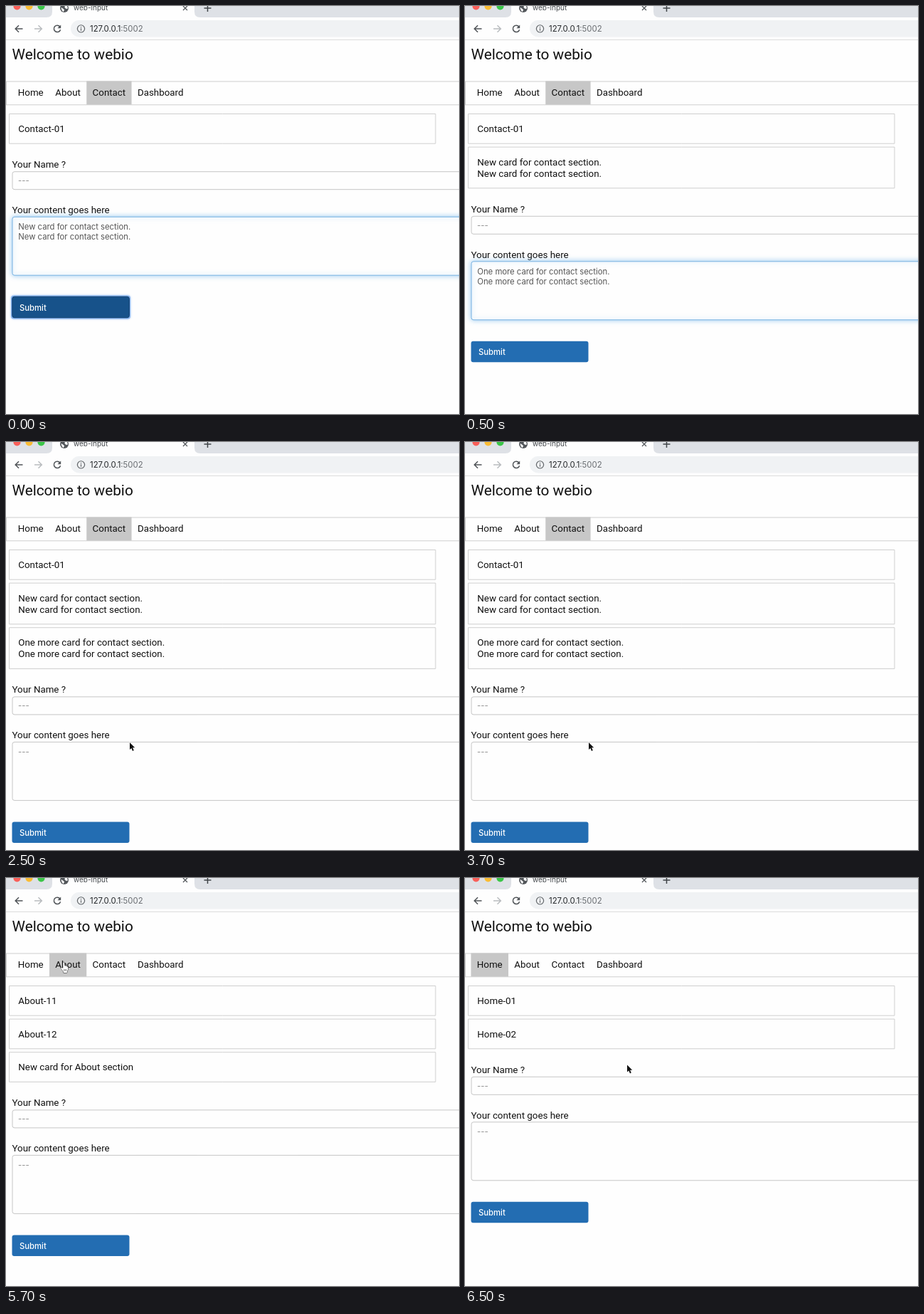
Recreate the animation shown at these times as an HTML page with a canvas. Size 637x573 px, loop 8000 ms.

```html
<!DOCTYPE html>
<html lang="en">
<head>
<meta charset="utf-8">
<title>web-input</title>
<style>
  html, body { margin: 0; width: 100%; height: 100%; overflow: hidden; background: #fefefe; }
  canvas { display: block; width: 637px; height: 573px; }
</style>
</head>
<body>
<canvas id="stage" width="637" height="573"></canvas>
<script>
const ctx = document.getElementById('stage').getContext('2d');
const W = 637, H = 573, LOOP = 8000;
const PAGE = '#fefefe', LINE = '#cfcfcf', INK = '#111';
const BODY = '13.35px Roboto, sans-serif';
const FIELD = '11.3px Inter, sans-serif';

const twice = s => [s, s];
const newCard = twice('New card for contact section.');
const moreCard = twice('One more card for contact section.');

const scenes = [
  { until: 500, tab: 'Contact', cards: [['Contact-01']], draft: newCard, pressed: true },
  { until: 2500, tab: 'Contact', cards: [['Contact-01'], newCard], draft: moreCard },
  { until: 4500, tab: 'Contact', cards: [['Contact-01'], newCard, moreCard], arrow: [174, 422] },
  { until: 6500, tab: 'About', cards: [['About-11'], ['About-12'], ['New card for About section']], hand: [77, 118] },
  { until: LOOP, tab: 'Home', cards: [['Home-01'], ['Home-02']], arrow: [228, 262.5] }
];

function text(str, x, y, font, color = INK) {
  ctx.font = font;
  ctx.fillStyle = color;
  ctx.fillText(str, x, y);
}

function rect(x, y, w, h, color) {
  ctx.fillStyle = color;
  ctx.fillRect(x, y, w, h);
}

function rounded(x, y, w, h, r, fill, stroke, width = 1) {
  ctx.beginPath();
  ctx.roundRect(x, y, w, h, r);
  if (fill) { ctx.fillStyle = fill; ctx.fill(); }
  if (stroke) { ctx.strokeStyle = stroke; ctx.lineWidth = width; ctx.stroke(); }
}

function disc(x, y, r, color) {
  ctx.beginPath();
  ctx.arc(x, y, r, 0, Math.PI * 2);
  ctx.fillStyle = color;
  ctx.fill();
}

function line(d, color, width = 1.4) {
  ctx.strokeStyle = color;
  ctx.lineWidth = width;
  ctx.stroke(new Path2D(d));
}

function glow(color, blur, draw) {
  ctx.save();
  ctx.shadowColor = color;
  ctx.shadowBlur = blur;
  draw();
  ctx.restore();
}

function browser() {
  rect(0, 0, W, 16, '#dee1e6');
  ctx.fillStyle = PAGE;
  ctx.fill(new Path2D('M57 16Q65 16 65 8V0H265V8Q265 16 273 16Z'));
  ['#f9605a', '#fabc33', '#3bc648'].forEach((c, i) => disc(15.5 + 17 * i, 0.5, 5, c));

  disc(82, 3, 6, '#53575b');
  ctx.fillStyle = PAGE;
  ctx.fill(new Path2D('M77.5 2L80 3.5L82 5.2L81 8Q78 7 77.5 2ZM83 -1L86 0L87 3.5L84.5 4L82.5 2Z'));
  text('web-input', 95, 6, '10px Inter, sans-serif', '#45494d');
  line('M249 0L255 6M255 0L249 6', '#55595d', 1.3);
  line('M278.5 3H288.5M283.5 -2V8', '#3f4347', 1.5);

  line('M23.5 32H13.5M18 27.2L13.2 32L18 36.8', '#505458', 1.5);
  line('M40 32H50M45.5 27.2L50.3 32L45.5 36.8', '#b9bcbf', 1.5);
  line('M75.8 29A4.7 4.7 0 1 0 76.6 33.2', '#505458', 1.5);
  ctx.fillStyle = '#505458';
  ctx.fill(new Path2D('M77.2 26.4V31.2H72.4Z'));

  rounded(91, 20, W, 23.5, 11.7, '#f0f2f4');
  line('M105.5 26.8A5.1 5.1 0 1 1 105.49 26.8M105.5 31.3V34.8M105.5 29V30.3', '#5c6064', 1.1);
  const font = '11.4px Inter, sans-serif', host = '127.0.0.1';
  text(host, 118, 36, font, '#25282b');
  text(':5002', 118 + ctx.measureText(host).width, 36, font, '#6a6e72');
  rect(0, 47, W, 1, '#dcdcdc');
}

function nav(active) {
  text('Welcome to webio', 8.5, 75.3, '20.8px Roboto, sans-serif');
  rect(0, 105.5, W, 1, LINE);
  rect(0, 138.3, W, 1, LINE);
  rect(0, 106, 1, 33, LINE);
  let x = 8.4;
  for (const name of ['Home', 'About', 'Contact', 'Dashboard']) {
    ctx.font = BODY;
    const w = ctx.measureText(name).width + 16.7;
    if (name === active) rect(x, 105.5, w, 33, '#c7c7c7');
    text(name, x + 8.35, 126.2, BODY);
    x += w;
  }
}

// Returns the bottom edge of the last card.
function cardList(cards) {
  let y = 151.5;
  for (const lines of cards) {
    const h = 25.7 + 16 * lines.length;
    rounded(4.5, y, 599.5, h, 0, null, LINE);
    lines.forEach((s, i) => text(s, 17.3, y + 25.5 + 16 * i, BODY));
    y += h + 4.9;
  }
  return y - 4.9;
}

function form(top, { draft, pressed }) {
  const box = (y, h, border) => rounded(9, y, W + 20, h, 3, PAGE, border);

  text('Your Name ?', 8.5, top + 34, BODY);
  box(top + 39.5, 25, '#c6c6c6');
  text('---', 17, top + 56, FIELD, '#8c8c8c');

  text('Your content goes here', 8.5, top + 98, BODY);
  const y = top + 103;
  if (draft) {
    glow('rgba(102,175,233,.65)', 7, () => box(y, 82, '#78b2e2'));
    draft.forEach((s, i) => text(s, 17.3, y + 17.8 + 14.1 * i, FIELD, '#555'));
  } else {
    box(y, 82, '#c6c6c6');
    text('---', 17, y + 17.3, FIELD, '#8c8c8c');
  }

  const by = top + 215;
  if (pressed) {
    glow('#9cc3f5', 3, () => rounded(7, by - 1.7, 168, 33, 4, '#86b3ee'));
    rounded(8.8, by, 164.5, 29.5, 3, '#17528a', '#123f6c');
  } else {
    rounded(8.5, by, 165, 29.5, 3, '#236db2');
  }
  text('Submit', 19, by + 19.4, '500 11.3px Inter, sans-serif', '#fff');
}

function pointer([x, y], d, fill, stroke) {
  ctx.save();
  ctx.translate(x, y);
  const p = new Path2D(d);
  ctx.lineJoin = 'round';
  ctx.lineWidth = fill === '#fff' ? 1 : 1.6;
  ctx.strokeStyle = stroke;
  ctx.stroke(p);
  ctx.fillStyle = fill;
  ctx.fill(p);
  ctx.restore();
}

const ARROW = 'M0 0V10L2.3 7.9L4 11.9L5.8 11.1L4.1 7.3H7.2Z';
const HAND = 'M3.2 9V1.4Q3.2 .2 4.2 .2T5.2 1.4V5.2Q6.6 4.6 7 5.8Q8.4 5.2 8.7 6.5Q10.2 6.2 10.2 7.8' +
  'V10.5L8.8 13V15H3.7V13.3L.6 9.4Q0 8.2 .8 7.8T3.2 9Z';

function draw(t) {
  const scene = scenes.find(s => t < s.until);
  rect(0, 0, W, H, PAGE);
  browser();
  nav(scene.tab);
  form(cardList(scene.cards), scene);
  if (scene.arrow) pointer(scene.arrow, ARROW, '#111', '#fff');
  if (scene.hand) {
    pointer(scene.hand, HAND, '#fff', '#222');
    ctx.save();
    ctx.translate(...scene.hand);
    line('M4.6 10V12.6M6.1 10V12.6M7.6 10V12.6', '#333', 0.6);
    ctx.restore();
  }
}

const start = performance.now();
function tick() {
  draw((performance.now() - start) % LOOP);
  requestAnimationFrame(tick);
}
tick();
</script>
</body>
</html>
```
